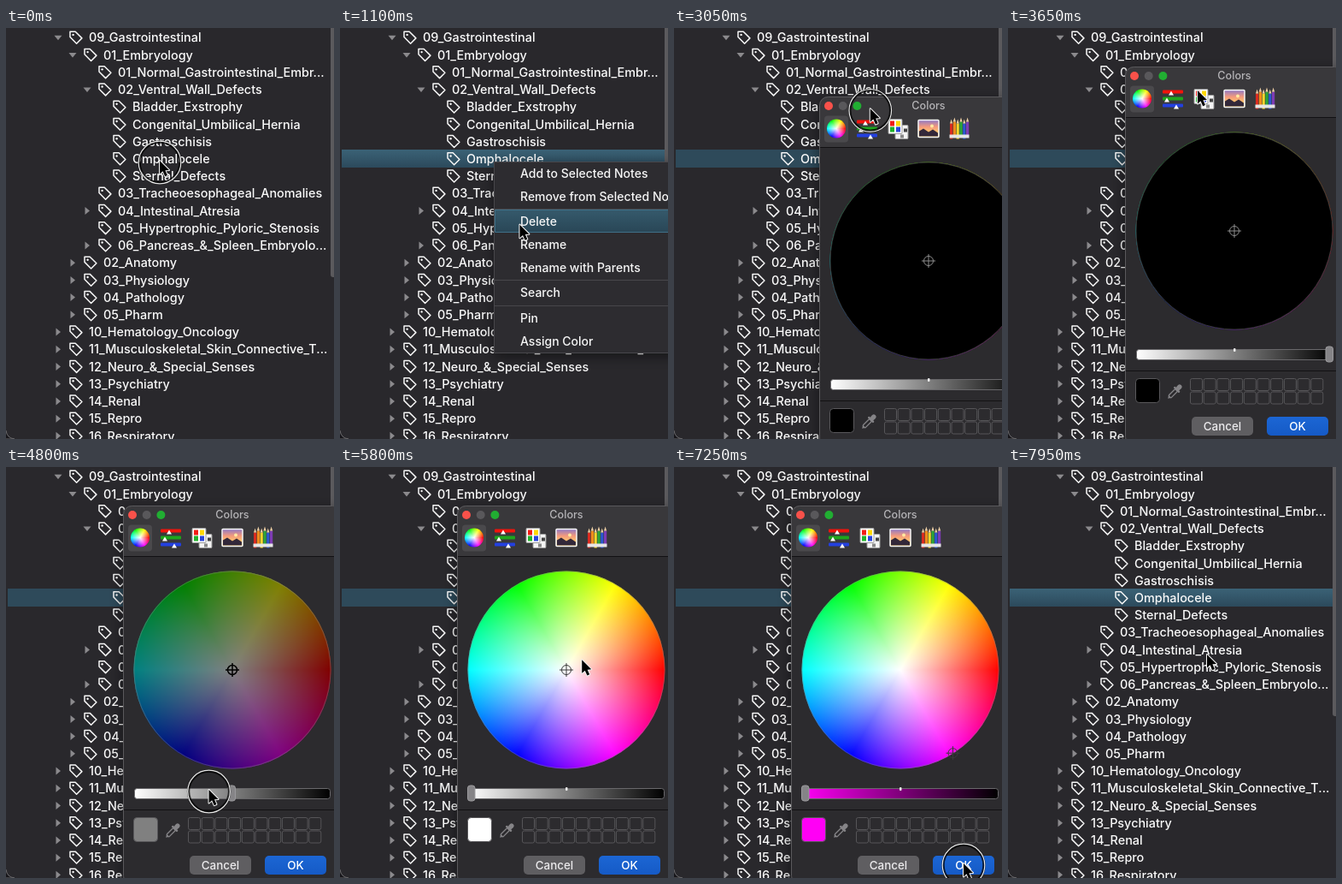
Recreate the animation shown at these times as an HTML page with a canvas. Size 384 by 480 pixels, loop 8000 ms.

```html
<!DOCTYPE html>
<html lang="en">
<head>
<meta charset="utf-8">
<title>Tag colours</title>
<style>
html, body { margin: 0; width: 100%; height: 100%; overflow: hidden; background: #29282c; }
canvas { display: block; width: 384px; height: 480px; }
</style>
</head>
<body>
<canvas id="stage" width="384" height="480"></canvas>
<script>
const canvas = document.getElementById('stage');
const ctx = canvas.getContext('2d');
const LOOP = 8000, TAU = Math.PI * 2;
const FONT = 'Inter, "Liberation Sans", sans-serif';

// Tree rows: indent level, arrow state (v open, > closed, - leaf), label
const TREE = `0v09_Gastrointestinal
1v01_Embryology
2-01_Normal_Gastrointestinal_Embr...
2v02_Ventral_Wall_Defects
3-Bladder_Exstrophy
3-Congenital_Umbilical_Hernia
3-Gastroschisis
3-Omphalocele
3-Sternal_Defects
2-03_Tracheoesophageal_Anomalies
2>04_Intestinal_Atresia
2-05_Hypertrophic_Pyloric_Stenosis
2>06_Pancreas_&_Spleen_Embryolo...
1>02_Anatomy
1>03_Physiology
1>04_Pathology
1>05_Pharm
0>10_Hematology_Oncology
0>11_Musculoskeletal_Skin_Connective_T...
0>12_Neuro_&_Special_Senses
0>13_Psychiatry
0>14_Renal
0>15_Repro
0>16_Respiratory`.split('\n').map(s => ({ level: +s[0], arrow: s[1], label: s.slice(2) }));
const SELECTED = 7;

const MENU = [['Add to Selected Notes', 170], ['Remove from Selected Notes', 197], ['Delete', 226],
  ['Rename', 253], ['Rename with Parents', 280], ['Search', 309], ['Pin', 339], ['Assign Color', 366]];

// Pointer path: time, x, y, and 1 when the move towards the point is linear
const PATH = [[0, 180, 155], [550, 180, 155], [1050, 210, 225], [1500, 222, 356], [2290, 222, 356],
  [2720, 335, 96], [2800, 335, 96], [3130, 212, 94], [3350, 197, 59], [3420, 197, 59], [3650, 222, 73],
  [3850, 226, 76], [4350, 376, 377], [4500, 376, 377], [5100, 100, 377, 1], [5300, 100, 377],
  [5780, 283, 225], [5880, 285, 228], [6250, 312, 308], [6320, 312, 308], [6560, 334, 346],
  [6720, 334, 346], [7150, 339, 463], [7420, 339, 463], [7900, 233, 219], [8000, 233, 219]];
const PRESSES = [[0, 300], [1560, 1720], [2760, 3400], [4440, 5280], [6280, 6700], [7200, 7360]];
const [, , TITLE_DRAG, SLIDER_DRAG, WHEEL_DRAG] = PRESSES;
const SLIDER_LAG = 58;

const clamp = (v, lo = 0, hi = 1) => Math.min(hi, Math.max(lo, v));
const ramp = (t, a, b) => clamp((t - a) / (b - a));

function pointer(t) {
  const i = PATH.findIndex(k => k[0] > t);
  const [t0, x0, y0] = PATH[i - 1], [t1, x1, y1, linear] = PATH[i];
  const p = ramp(t, t0, t1), e = linear ? p : p * p * (3 - 2 * p);
  return { x: x0 + (x1 - x0) * e, y: y0 + (y1 - y0) * e };
}

function hsv(h, s, v) {
  const channel = n => {
    const k = (n + h / 60) % 6;
    return Math.round(255 * v * (1 - s * clamp(Math.min(k, 4 - k))));
  };
  return `rgb(${channel(5)},${channel(3)},${channel(1)})`;
}

function box(x, y, w, h, r, fill, stroke) {
  ctx.beginPath();
  ctx.roundRect(x, y, w, h, r);
  paint(fill, stroke);
}
function disc(x, y, r, fill, stroke) {
  ctx.beginPath();
  ctx.arc(x, y, r, 0, TAU);
  paint(fill, stroke);
}
function poly(points, fill, stroke) {
  ctx.beginPath();
  points.forEach(p => ctx.lineTo(...p));
  ctx.closePath();
  paint(fill, stroke);
}
function paint(fill, stroke) {
  if (fill) { ctx.fillStyle = fill; ctx.fill(); }
  if (stroke) { ctx.strokeStyle = stroke; ctx.stroke(); }
}
function line(x0, y0, x1, y1, color) {
  ctx.beginPath();
  ctx.moveTo(x0, y0);
  ctx.lineTo(x1, y1);
  paint(null, color);
}
function text(s, x, middle, size, color, align = 'left') {
  ctx.font = `500 ${size}px ${FONT}`;
  ctx.textAlign = align;
  ctx.fillStyle = color;
  ctx.fillText(s, x, middle + size * 0.36);
}
function gradient(x0, y0, x1, y1, ...colors) {
  const g = ctx.createLinearGradient(x0, y0, x1, y1);
  colors.forEach((c, i) => g.addColorStop(i / (colors.length - 1), c));
  return g;
}
function at(x, y, draw) {
  ctx.save();
  ctx.translate(x, y);
  draw();
  ctx.restore();
}

function tagIcon() {
  ctx.lineWidth = 1.5;
  ctx.lineJoin = 'round';
  poly([[-7, -7], [-0.8, -7], [6.9, 0.6], [0.6, 6.9], [-7, -0.8]], null, '#f6f6f6');
  disc(-3.4, -3.4, 1.2, '#f6f6f6');
}

function drawTree(selected, active) {
  ctx.fillStyle = '#29282c';
  ctx.fillRect(0, 0, 384, 480);
  TREE.forEach(({ level, arrow, label }, i) => {
    const y = 11.3 + i * 20.22, x = level * 17;
    if (i === SELECTED && selected) {
      ctx.fillStyle = active ? gradient(0, y - 10, 0, y + 10, '#3a6175', '#2c4a5c') : '#2e4a5a';
      ctx.fillRect(2, Math.floor(y - 10), 382, 21);
    }
    if (arrow === 'v') at(x + 61, y, () => poly([[-4.5, -2.5], [4.5, -2.5], [0, 3]], '#8b8a8d'));
    if (arrow === '>') at(x + 61, y, () => poly([[-2.5, -4.5], [3, 0], [-2.5, 4.5]], '#8b8a8d'));
    at(x + 82, y, tagIcon);
    text(label, x + 97, y, 14.4, '#fafafa');
  });
  box(380, -10, 8, 301, 3, '#5b5a5d');
  ctx.lineWidth = 1;
  ctx.beginPath();
  ctx.moveTo(0, 470);
  ctx.quadraticCurveTo(1, 479, 10, 480);
  ctx.lineTo(0, 480);
  paint('#17161a', '#6b6a6d');
}

function drawMenu(y, alpha) {
  ctx.save();
  ctx.globalAlpha = alpha;
  ctx.shadowColor = 'rgba(0,0,0,.45)';
  ctx.shadowBlur = 14;
  ctx.shadowOffsetY = 4;
  box(180, 156, 240, 224, 0, '#2d2c30');
  ctx.shadowColor = 'transparent';
  ctx.lineWidth = 1;
  box(180.5, 156.5, 240, 223, 0, null, '#48474b');
  for (const sep of [211.5, 294.5, 324.5]) line(181, sep, 384, sep, '#48474b');
  for (const [label, mid] of MENU) {
    if (y > 160 && Math.abs(y - mid) < 13.5) {
      box(181.5, mid - 13.5, 230, 26, 0, gradient(0, mid - 13, 0, mid + 13, '#35596b', '#294656'), '#3f7088');
    }
    text(label, 211, mid, 14, '#f6f6f6');
  }
  ctx.restore();
}

function hueWheel(r) {
  const hues = ctx.createConicGradient(0, 0, 0);
  for (let i = 0; i <= 6; i++) hues.addColorStop(i / 6, hsv((360 - i * 60) % 360, 1, 1));
  disc(0, 0, r, hues);
  const white = ctx.createRadialGradient(0, 0, 0, 0, 0, r);
  white.addColorStop(0, '#fff');
  white.addColorStop(1, 'rgba(255,255,255,0)');
  disc(0, 0, r, white);
}

const TOOLS = [
  () => { box(-14, -15, 28, 31, 4, '#4a494c'); hueWheel(11); },
  () => ['#f2140c', '#1fa51c', '#2340e0'].forEach((c, i) => {
    const y = i * 8 - 8, knob = [-2, -7, 4][i];
    box(-12, y - 2, 24, 4, 1, c);
    poly([[knob, y - 1], [knob + 3, y + 4], [knob - 3, y + 4]], '#fff');
  }),
  () => {
    ctx.lineWidth = 1;
    box(-3, -4, 15, 16, 1, '#f4f4f4', '#999');
    box(-11, -11, 16, 17, 1, '#fff', '#999');
    ['#f21c16', '#ffd800', '#20b32c', '#2a45dc'].forEach((c, i) =>
      box(-9 + (i % 2) * 7, -9 + (i >> 1) * 7, 5, 6, 0, c));
    box(7, 0, 4, 4, 0, '#444');
    box(3, 7, 4, 4, 0, '#888');
  },
  () => {
    ctx.lineWidth = 1.5;
    box(-12, -10, 24, 20, 1, gradient(0, -10, 0, 6, '#8d78c8', '#f49a7c', '#ffd36a'), '#f5f5f5');
    poly([[-11, 9], [-11, 3], [-6, 0], [0, 4], [5, 1], [11, 5], [11, 9]], '#33283a');
    disc(4, -3, 2, '#ffe9a0');
  },
  () => {
    ['#d92b20', '#f08a1c', '#f3d62c', '#2ea83a', '#2c58d4', '#7e3cb4'].forEach((c, i) => {
      const x = -11 + i * 3.8, top = -6 - (i % 2) * 2;
      box(x, top, 3.2, 18, 0, c);
      poly([[x, top], [x + 1.6, top - 5], [x + 3.2, top]], '#edcfa4');
    });
    box(-11.5, 7, 23, 4, 0, '#e6e6e6');
  }
];

function eyedropper() {
  ctx.rotate(Math.PI / 4);
  ctx.lineWidth = 1.3;
  box(-2, -3, 4, 11, 1, null, '#858487');
  poly([[-2, 8], [2, 8], [0, 11]], '#858487');
  box(-4.5, -5, 9, 2.5, 1, '#858487');
  box(-2.7, -11, 5.4, 7, 2.5, '#858487');
}

function crosshair(color, width) {
  ctx.lineWidth = width;
  disc(0, 0, 5.5, null, color);
  line(-8, 0, 8, 0, color);
  line(0, -8, 0, 8, color);
}

function drawPanel({ hue, sat, value, markX, markY }) {
  ctx.save();
  ctx.shadowColor = 'rgba(0,0,0,.5)';
  ctx.shadowBlur = 16;
  ctx.shadowOffsetY = 5;
  box(-1, -1, 256, 443, 10, '#2c2b2e');
  ctx.restore();
  box(-1, -1, 256, 59, [10, 10, 0, 0], '#39383b');
  ctx.lineWidth = 1;
  line(0, 58.5, 254, 58.5, '#121113');
  line(0, 354.5, 254, 354.5, '#121113');
  box(-0.5, -0.5, 255, 442, 10, null, '#5a595c');

  ['#f9514a', '#59585b', '#21ae32'].forEach((c, i) => disc(10 + i * 16.7, 10, 5, c));
  text('Colors', 127, 9.5, 12.6, '#b5b4b7', 'center');
  TOOLS.forEach((draw, i) => at(19 + i * 36, 36.5, draw));

  at(127, 191, () => {
    hueWheel(115.5);
    if (value < 1) disc(0, 0, 115.5, `rgba(0,0,0,${1 - value})`);
    ctx.lineWidth = 1;
    disc(0, 0, 115, null, 'rgba(130,130,130,.45)');
    at(markX, markY, () => crosshair(value < 0.25 ? '#8c8c8c' : value < 0.8 ? '#000' : '#3a3a3a',
      value > 0.25 && value < 0.8 ? 1.5 : 1));
  });

  box(12.5, 329.5, 229, 12, 3, gradient(12, 0, 242, 0, hsv(hue, sat, 1), '#000'), '#69686b');
  box(126, 328, 2.5, 4, 1, '#eee');
  box(234 - value * 222.5, 326, 8.5, 18, 3, '#858487', '#9b9a9d');

  box(11.5, 363.5, 28, 28, 4, hsv(hue, sat, value), '#59585b');
  at(57, 379, eyedropper);
  for (let i = 0; i < 20; i++) {
    box(75.5 + (i % 10) * 15.7, 363.5 + (i > 9) * 15.5, 14, 14, 2, null, '#565558');
  }
  box(77, 408, 72, 22, 5, '#5f5e61');
  text('Cancel', 113, 419, 13.4, '#ecebed', 'center');
  box(165, 408, 72, 22, 5, gradient(0, 408, 0, 430, '#1c66d4', '#155ac6'));
  text('OK', 201, 419, 13.4, '#fff', 'center');
}

function drawPointer({ x, y }, pressed) {
  at(x, y, () => {
    if (pressed) {
      ctx.lineWidth = 3.4;
      disc(0, 2, 24, null, 'rgba(0,0,0,.75)');
      ctx.lineWidth = 1.2;
      disc(0, 2, 24.8, null, '#e8e8e8');
    }
    const arrow = [[0, 0], [0, 15.5], [3.6, 12.3], [6.2, 18.2], [8.9, 17], [6.4, 11.3], [11, 11]];
    ctx.lineWidth = 2;
    ctx.lineJoin = 'round';
    poly(arrow, null, '#f4f4f4');
    poly(arrow, '#000');
  });
}

// Each setting follows the pointer during its drag and keeps its last value afterwards.
function pickedColor(t) {
  const slide = pointer(clamp(t - SLIDER_LAG, ...SLIDER_DRAG));
  const value = clamp((376 - slide.x) / 222);
  if (t < WHEEL_DRAG[0]) return { hue: 0, sat: 0, value, markX: 0, markY: 0 };
  const p = pointer(Math.min(t, WHEEL_DRAG[1]));
  const dx = p.x - 265, dy = p.y - 237, dist = Math.hypot(dx, dy);
  const k = Math.min(1, 115 / dist);
  return {
    hue: (360 - Math.atan2(dy, dx) * 360 / TAU) % 360,
    sat: Math.min(1, dist / 115), value, markX: dx * k, markY: dy * k
  };
}

function render(t) {
  const p = pointer(t);
  const panelOpen = t >= 1790 && t < 7560;
  drawTree(t >= 150, t < 1790 || t >= 7450);
  if (panelOpen) {
    const drag = pointer(clamp(t, ...TITLE_DRAG));
    const grab = pointer(TITLE_DRAG[1]);
    ctx.save();
    ctx.globalAlpha = 1 - ramp(t, 7420, 7560);
    ctx.translate(Math.round(138 + drag.x - grab.x), Math.round(46 + drag.y - grab.y));
    drawPanel(pickedColor(t));
    ctx.restore();
  }
  if (t >= 150 && t < 1950) drawMenu(p.y, 1 - ramp(t, 1740, 1940));
  drawPointer(p, PRESSES.some(([a, b]) => t >= a && t < b));
}

const start = performance.now();
function tick() {
  render((performance.now() - start) % LOOP);
  requestAnimationFrame(tick);
}
tick();
</script>
</body>
</html>
```
